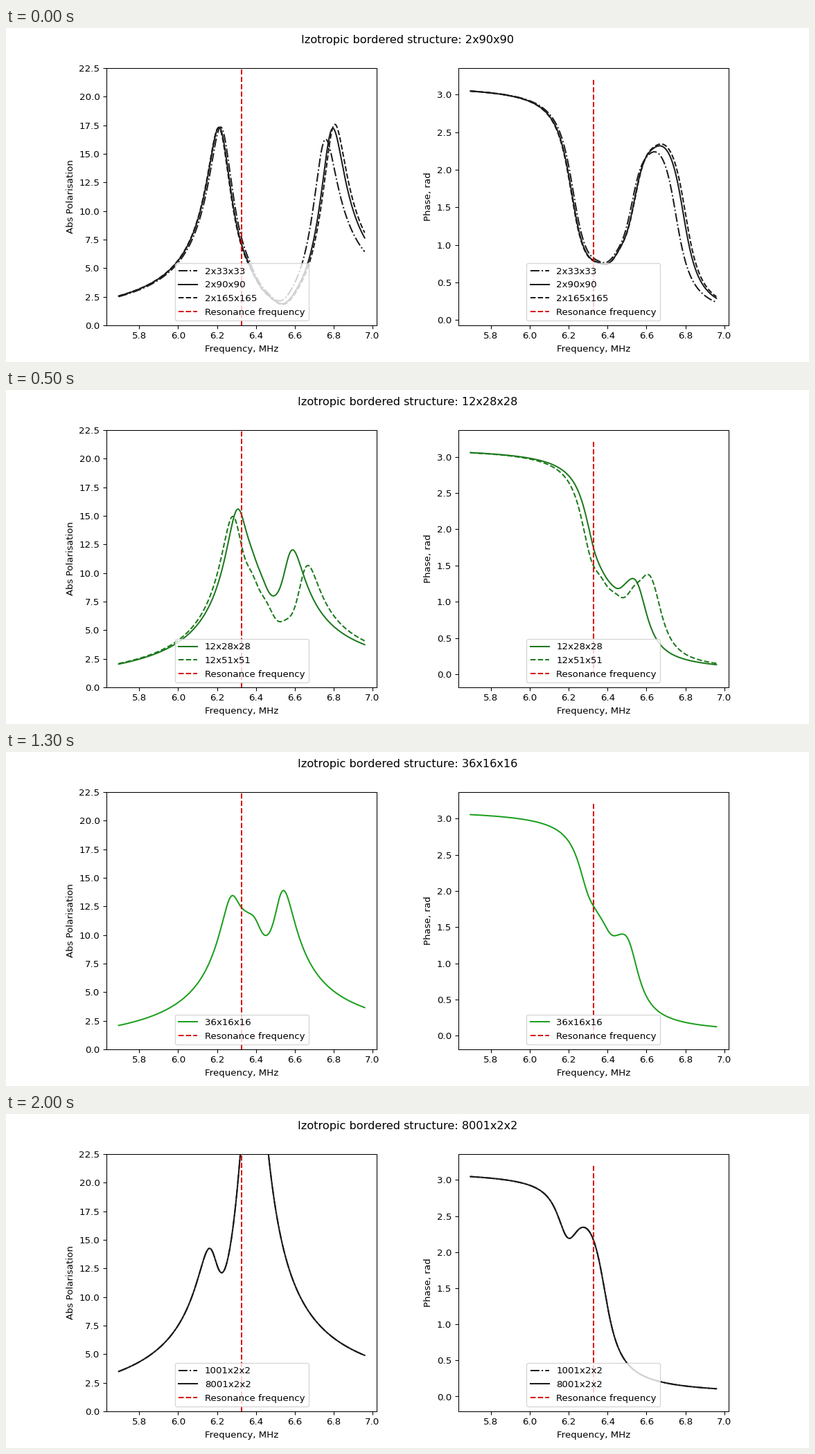
A matplotlib script that plays this animation: 1159x483 px, repeating every 2.05 s.

```python
import numpy as np
import matplotlib.pyplot as plt
from matplotlib.animation import FuncAnimation

W, H, DPI = 1159, 483, 96.6
FRAMES, STEP_MS = 41, 50
F0, LOSS, F_REF = 6.327, 0.124, 6.4
CUBE = 20                      # edge of the 8000-cell cube
MAIN = 8000
SERIES = ((1000, "-."), (MAIN, "-"), (27000, "--"))
RED = (0.84, 0.0, 0.02)
freq = np.linspace(0.9 * F0, 1.1 * F0, 500)


def cells(volume, k):
    """Layers and side of the body at step k, or None if it has no such shape."""
    edge = round(volume ** (1 / 3))
    if k < CUBE:
        layers = k + 1
        return (layers, round((volume / layers) ** 0.5)) if layers <= edge else None
    side = 2 * CUBE + 1 - k
    if side > edge + 1 or volume > MAIN:
        return None
    return volume // side ** 2, side


def resonances(n, m):
    """Frequencies and heights of five modes of a body of n layers, m x m cells."""
    n = min(n, 1000)           # longer needles behave alike
    ratio = n / m
    slim = max(ratio, 1)
    turn = np.tanh(np.log(ratio))   # -1 flat, 0 cube, 1 needle

    low = 6.211 + 0.11 * np.tanh(4 * ratio) - 0.166 * (1 - slim ** -0.3)
    high = 6.576 - 0.19 * m ** -0.7 - 0.1 / n ** 0.5 + 0.338 * np.exp(-4.8 * ratio)
    poles = low + (high - low) * np.array([0, 0.24, 0.44, 0.72, 1])

    total = 27 + 15.5 / m + 8 * np.exp(-10 * ratio)
    top = 0.22 + 2.3 / (m + 3) + 0.25 * np.exp(-15 * ratio)
    spread = 1 - 0.93 * np.exp(-(min(n, m) - 1) * slim ** 0.25 / 24)
    upper = 0.22 * abs(turn)
    centre = (1 - upper) * (0.5 + 0.15 * turn)
    inner = spread * np.array([1 - upper - centre, centre, upper])
    shares = np.array([(1 - top) * (1 - spread), *((1 - top) * inner), top])
    return poles, total * shares


def response(shape):
    """Complex polarisation: a sum of damped resonances."""
    total = 0
    for pole, height in zip(*resonances(*shape)):
        total = total + height / (freq**2 - pole**2 - 1j * LOSS * freq)
    return total * freq**2 * LOSS / F_REF


def label(shape):
    n, m = shape
    return f"{n + 1}x{m + 1}x{m + 1}"


# The small margin keeps the pixel size from being rounded down
fig, (ax_abs, ax_phase) = plt.subplots(
    1, 2, figsize=((W + 0.01) / DPI, (H + 0.01) / DPI), dpi=DPI)
fig.subplots_adjust(left=0.125, right=0.9, bottom=0.11, top=0.88, wspace=0.3)
title = fig.suptitle("")


def draw(k):
    for ax in (ax_abs, ax_phase):
        ax.clear()
    green = 0.1 + 0.75 * min(k, 2 * CUBE - k) / CUBE
    color = (0.11, green, 0.11)
    phases = []
    for volume, style in SERIES:
        shape = cells(volume, k)
        if shape is None:
            continue
        wave = response(shape)
        phases.append(np.angle(wave))
        for ax, y in ((ax_abs, abs(wave)), (ax_phase, phases[-1])):
            ax.plot(freq, y, style, color=color, label=label(shape))

    span = (np.min(phases) - 0.15, np.max(phases) + 0.15)
    for ax, ends, name in ((ax_abs, (0, 22.5), "Abs Polarisation"),
                           (ax_phase, span, "Phase, rad")):
        ax.plot([F0, F0], ends, "--", color=RED, label="Resonance frequency")
        ax.set_xlabel("Frequency, MHz")
        ax.set_ylabel(name)
        ax.legend(loc="lower center")
    ax_abs.set_ylim(0, 22.5)
    title.set_text("Izotropic bordered structure: " + label(cells(MAIN, k)))
    return []


anim = FuncAnimation(fig, draw, frames=FRAMES, init_func=lambda: draw(0),
                     interval=STEP_MS, repeat=True, repeat_delay=0, blit=False)
plt.show()
```
